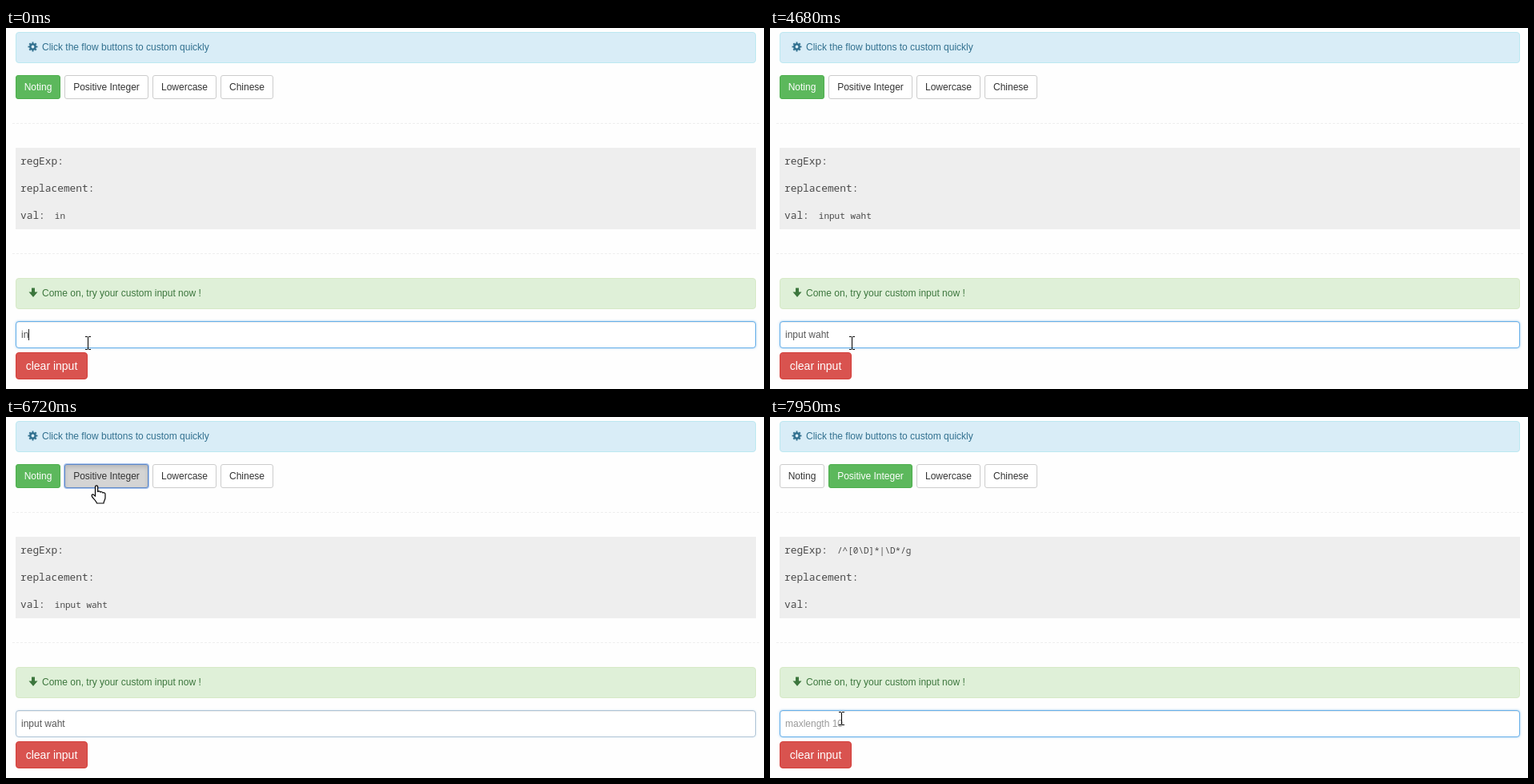
An HTML page for the animation above (8000 ms loop, 947 by 452 pixels).

```html
<!DOCTYPE html>
<html lang="en">
<head>
<meta charset="utf-8">
<title>Custom input demo</title>
<style>
  html, body { margin: 0; width: 100%; height: 100%; overflow: hidden; background: #fefefe; }
  body { position: relative; font: 12px Arial, "Liberation Sans", sans-serif; color: #333; }
  div, hr, svg { position: absolute; box-sizing: border-box; margin: 0; white-space: pre; }
  svg { left: 0; top: 0; }
  .wide { left: 12px; width: 925px; border: 1px solid; border-radius: 4px; }
  .alert { height: 39px; line-height: 36px; padding-left: 32px; }
  .info { top: 5px; color: #31708f; background: #d9edf7; border-color: #bce8f1; }
  .success { top: 313px; color: #3c763d; background: #dff0d8; border-color: #d6e9c6; }
  .btn { top: 59px; height: 30px; line-height: 28px; text-align: center;
         background: #fff; border: 1px solid #ccc; border-radius: 3px; }
  .hover { background: #e6e6e6; border-color: #adadad; }
  .chosen { background: #5cb85c; border-color: #4cae4c; color: #fff; }
  .ring { border-color: #5f89c8; box-shadow: 0 0 0 1px #a9c4ee; }
  .pressed { background: #d4d4d4; box-shadow: 0 0 0 1px #a9c4ee, inset 0 3px 5px rgba(0,0,0,.125); }
  .dark { background: #449d44; }
  .clear { left: 12px; top: 406px; width: 90px; height: 34px; line-height: 32px; font-size: 14px;
           text-align: center; color: #fff; background: #d9534f; border: 1px solid #d43f3a; border-radius: 4px; }
  hr { left: 8px; width: 933px; border: 0; border-top: 1px dashed #eee; }
  .panel { left: 12px; top: 150px; width: 925px; height: 102px; background: #eee; }
  #field { top: 367px; height: 34px; line-height: 32px; padding-left: 6px; color: #555; background: #fff; }
  #caret { display: inline-block; width: 1px; height: 14px; margin-right: -1px; vertical-align: -3px; background: #222; }
  #hint { color: #999; }
  .label, .value { font-family: Consolas, "Noto Sans Mono", monospace; fill: #4a4a4a; }
  .label { font-size: 12.83px; }
  .value { font-size: 11px; }
</style>
</head>
<body>
<div class="wide alert info">Click the flow buttons to custom quickly</div>
<div id="noting" class="btn" style="left:12px;width:56px">Noting</div>
<div id="integer" class="btn" style="left:73px;width:105px">Positive Integer</div>
<div class="btn" style="left:183px;width:80px">Lowercase</div>
<div class="btn" style="left:268px;width:66px">Chinese</div>
<hr style="top:119px">
<div class="panel"></div>
<hr style="top:282px">
<div class="wide alert success">Come on, try your custom input now !</div>
<div id="field" class="wide"><span id="typed"></span><i id="caret"></i><span id="hint"></span></div>
<div class="clear">clear input</div>

<svg width="947" height="452">
  <g fill="none" stroke="#31708f">
    <circle cx="33.5" cy="23.5" r="3.2" stroke-width="2.6"/>
    <circle cx="33.5" cy="23.5" r="5" stroke-width="2" pathLength="16" stroke-dasharray="1 1" stroke-dashoffset=".5"/>
  </g>
  <path d="M32 325.5h4v5h3.5L34 337l-5.500-6.500H32z" fill="#3c763d"/>
  <text class="label" x="18" y="171">regExp:</text>
  <text class="label" x="18" y="205">replacement:</text>
  <text class="label" x="18" y="239">val:</text>
  <text class="value" id="regexp" x="84" y="171"></text>
  <text class="value" id="val" x="60.8" y="239"></text>
  <g id="pointer" stroke="#000" fill="#fff">
    <path id="beam" fill="none" d="M-3-7.500H0M1-7.500H4M.5-7V8M-3 8.500H0M1 8.500H4"/>
    <path id="arrow" d="M.5 .5V16.500L4.200 13 6.600 18.500 9 17.500 6.600 12H11.500z"/>
    <path id="hand" stroke-width="1.200" d="M-1.500 13V1.500a1.600 1.600 0 0 1 3.200 0V8c0-1.500 3.200-1.500 3.200.6c0-1.400 3.100-1.200 3.100.8c0-1.200 3-1 3 1.200V15c0 3-2 4-2 7H.5C0 19-5 15.500-5.800 13c-.6-2 1.500-2.600 2.600-1.400z"/>
  </g>
</svg>

<script>
const LOOP = 8000, HOVER = 6430, PRESS = 6625, RELEASE = 6950, FOCUS = 7420, FADE = 150;
const PHRASE = "input waht";
const keyTimes = [0, 0, 370, 710, 920, 1110, 1320, 1510, 1840, 2060];
const blinks = [2590, 3120, 3650, 4150, 4680, 5230, 5760, 6290, PRESS, FOCUS, 7950];
// time, x, y
const path = [
  [0, 102, 394], [5980, 102, 394], [6140, 122, 310], [6290, 130, 170], [6420, 113, 88],
  [6500, 113, 86], [6950, 113, 86], [7080, 109, 448], [7140, 108, 480], [7230, 106, 470],
  [7290, 104, 430], [7410, 89, 378], [7540, 89, 377], [LOOP, 89, 377]
];

const el = id => document.getElementById(id);
const countPast = (times, t) => times.filter(time => time <= t).length;
const mix = (a, b, k) => a + (b - a) * k;
const ease = k => { k = Math.max(0, Math.min(1, k)); return k * k * (3 - 2 * k); };
const setText = (id, text) => { if (el(id).textContent !== text) el(id).textContent = text; };

function pointerAt(t) {
  const i = path.findIndex(p => p[0] > t);
  const a = path[i - 1], b = path[i], k = (t - a[0]) / (b[0] - a[0]);
  return [1, 2].map(j => Math.round(mix(a[j], b[j], k)));
}

function integerState(t) {
  if (t < HOVER) return "";
  if (t < PRESS) return "hover";
  if (t < RELEASE) return "ring pressed";
  return t < FOCUS ? "chosen dark ring" : "chosen";
}

function drawField(t) {
  const focus = t < FOCUS ? 1 - ease((t - PRESS) / FADE) : ease((t - FOCUS) / FADE);
  const border = [[204, 102], [204, 175], [204, 233]].map(([a, b]) => Math.round(mix(a, b, focus)));
  el("field").style.borderColor = `rgb(${border})`;
  el("field").style.boxShadow =
    `inset 0 1px 1px rgba(0,0,0,.075), 0 0 3px rgba(102,175,233,${0.6 * focus})`;
  el("caret").style.visibility = countPast(blinks, t) % 2 ? "hidden" : "visible";
}

function drawPointer(t) {
  const [x, y] = pointerAt(t);
  const kind = y < 90 ? "hand" : y >= 367 && y <= 401 ? "beam" : "arrow";
  for (const id of ["hand", "beam", "arrow"]) el(id).style.display = id === kind ? "" : "none";
  el("pointer").setAttribute("transform", `translate(${x} ${y})`);
}

function draw(t) {
  const switched = t >= RELEASE;
  const typed = switched ? "" : PHRASE.slice(0, countPast(keyTimes, t));
  setText("typed", typed);
  setText("val", typed);
  setText("hint", switched ? "maxlength 10" : "");
  setText("regexp", switched ? "/^[0\\D]*|\\D*/g" : "");
  el("noting").className = switched ? "btn" : "btn chosen";
  el("integer").className = "btn " + integerState(t);
  drawField(t);
  drawPointer(t);
}

const start = performance.now();
function tick() {
  draw((performance.now() - start) % LOOP);
  requestAnimationFrame(tick);
}
tick();
</script>
</body>
</html>
```
